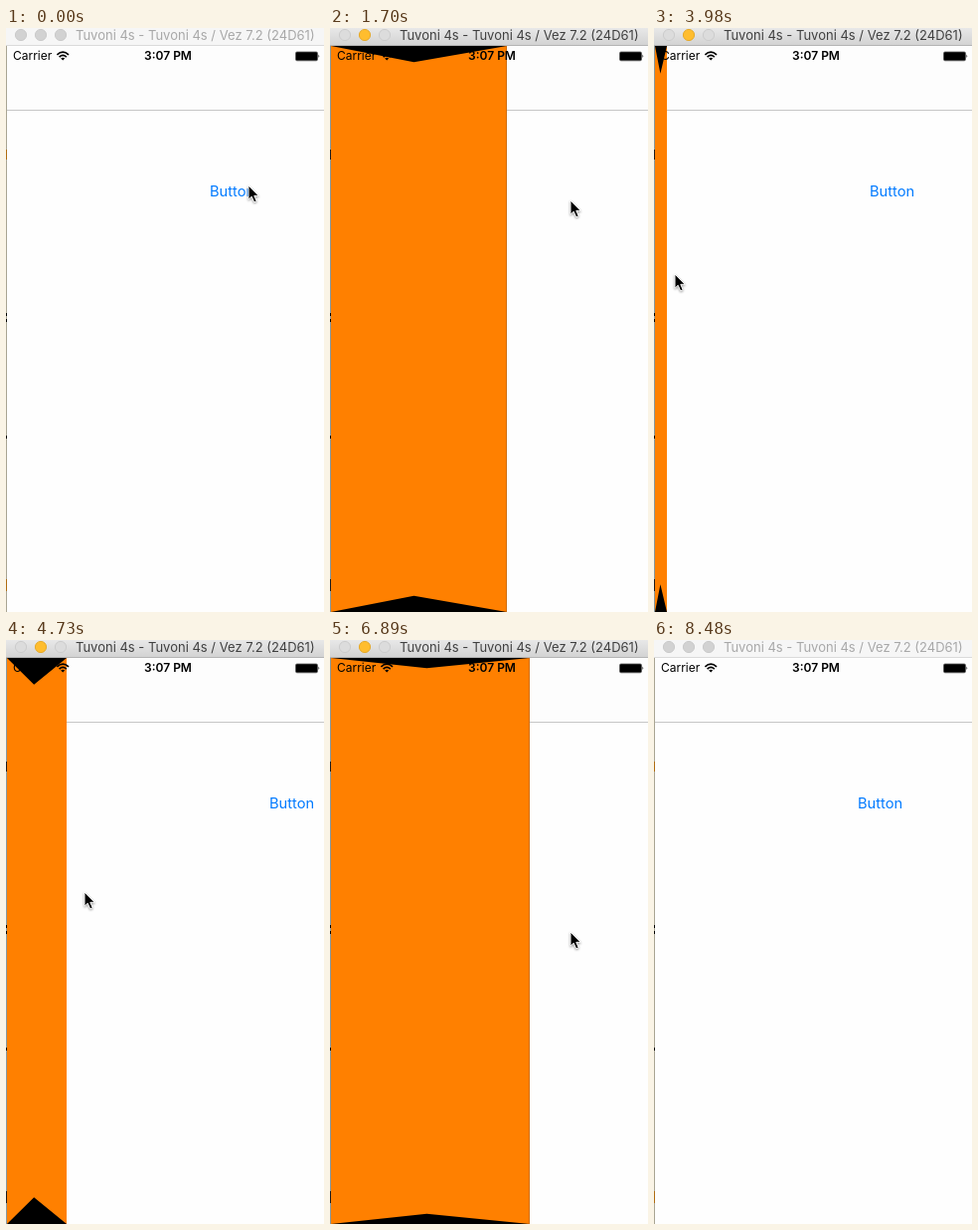
An HTML page for the animation above (8.52 s loop, 320 px wide and 586 px high).

```html
<!DOCTYPE html>
<html lang="en">
<head>
<meta charset="utf-8">
<title>Folding drawer</title>
<style>
  html, body { margin: 0; width: 100%; height: 100%; overflow: hidden; background: #fefefe; }
  svg { display: block; width: 320px; height: 586px; font-family: Inter, "Liberation Sans", sans-serif; }
  #edge { fill: #a9a593; }
  #marks { fill: #b06c10; }
  #bar { fill: #f6f6f6; }
  #barLine { fill: #dadada; }
  #title { font-size: 13px; fill: #a8a8a8; }
  .light { fill: #d2d2d2; stroke: #cacaca; }
  .active #edge { fill: #87979b; }
  .active #marks { fill: #1c1c1c; }
  .active #bar { fill: url(#chrome); }
  .active #barLine { fill: #b4b4b4; }
  .active #title { fill: #404040; }
  .active .light { fill: #dcdcdc; stroke: #cccccc; }
  .active .mini { fill: #ffbd2e; stroke: #e6aa2a; }
  #button { font-size: 14.7px; fill: #007aff; }
  #button.pressed { fill: #cfe4fd; }
  #cursor { filter: drop-shadow(0 1px 1px rgba(0, 0, 0, .4)); }
  .status { font-size: 12px; }
</style>
</head>
<body>
<svg id="stage" viewBox="0 0 320 586">
  <defs>
    <linearGradient id="chrome" x2="0" y2="1">
      <stop offset="0" stop-color="#e8e8e8"/>
      <stop offset="1" stop-color="#d3d3d3"/>
    </linearGradient>
  </defs>

  <rect width="320" height="586" fill="#fefefe"/>

  <g id="page">
    <rect y="18" width="320" height="64" fill="#fdfdfd"/>
    <rect y="82" width="320" height="1" fill="#c6c6c6"/>
    <text id="button" x="205" y="168.5">Button</text>
  </g>

  <g id="drawer">
    <rect id="back" x="1" y="18" height="568"/>
    <path id="fold" fill="#ff8000"/>
    <rect id="rim" y="18" width="1" height="568" fill="#b06010"/>
  </g>

  <text class="status" x="7" y="32.4">Carrier</text>
  <g fill="none" stroke="#000" stroke-width="1.7">
    <path d="M51.4 26.8Q57.2 21.4 63 26.8M53.6 29.1Q57.2 25.8 60.8 29.1"/>
    <path d="M57.2 32.6l-2-2.1q2-1.6 4 0z" fill="#000" stroke="none"/>
  </g>
  <text class="status" x="163" y="32.4" text-anchor="middle" font-weight="600">3:07 PM</text>
  <rect x="291.5" y="24" width="22" height="8.8" rx="1.4" stroke="#555" stroke-width=".8"/>
  <path d="M314.5 26.5q1.6 1.8 0 3.6z"/>

  <rect id="edge" width="1" height="586"/>
  <g id="marks">
    <rect y="122" width="1" height="10"/>
    <rect y="553" width="1" height="12"/>
  </g>
  <path d="M0 286h1v3h-1zM0 292h1v3h-1zM0 409h1v3h-1z"/>

  <rect id="bar" width="320" height="17"/>
  <rect id="barLine" y="17" width="320" height="1"/>
  <circle class="light" cx="15" cy="7" r="5.6"/>
  <circle class="light mini" cx="35" cy="7" r="5.6"/>
  <circle class="light" cx="55" cy="7" r="5.6"/>
  <text id="title" x="70" y="12">Tuvoni 4s - Tuvoni 4s / Vez 7.2 (24D61)</text>

  <path id="cursor" d="M0 0V14.2L3.2 11.2L5.7 16.8L8.2 15.7L5.8 10.3H10.2Z"
        stroke="#fff" stroke-width="1" stroke-linejoin="round"/>
</svg>

<script>
const LOOP = 8520, CLICK = 1110, RELEASED = 3400, CLOSE = 7150, RESET = 8480;
const FULL = 213;      // drawer width when open
const DEPTH = 980;     // perspective distance
const MID = 302, HALF = 284;
const $ = id => document.getElementById(id);

const clamp = (v, lo, hi) => Math.min(hi, Math.max(lo, v));
const mix = (a, b, u) => a + (b - a) * u;
const ramp = (t, from, to) => clamp((t - from) / (to - from), 0, 1);
const smooth = u => u * u * (3 - 2 * u);

// The pointer rests between strokes: start, end, x, y reached.
const strokes = [
  [500, 820, 222, 162],
  [1300, 1700, 242, 173],
  [1700, 2250, 268, 225],
  [2500, 2980, 133, 215],
  [2980, 3500, 7, 246],
  [3850, 4550, 84, 253],
  [4670, 5530, 10, 256],
  [5600, 6160, 184, 278],
  [6300, 7010, 254, 296],
  [7150, 7610, 237, 298]
];

const pointerAt = t => strokes.reduce(([x, y], [from, to, nx, ny]) => {
  const u = ramp(t, from, to);
  return [mix(x, nx, u), mix(y, ny, u)];
}, [244, 158]);

// A tap opens, a drag closes, edge drags open again, a last tap closes.
function widthAt(t, x) {
  const tapped = FULL * smooth(ramp(t, 1050, 1930));
  if (t < 2500) return tapped;
  if (t < RELEASED) return clamp(x - 55, 0, FULL);
  if (t < CLOSE) {
    const dragged = clamp((x - 7) * 0.832, 0, FULL);
    return mix(dragged, FULL, ramp(t, 6850, 7010));
  }
  return FULL * (1 - smooth(ramp(t, CLOSE, 7872)));
}

// Two hinged panels seen in perspective from the left edge.
function drawDrawer(w) {
  $('page').setAttribute('transform', `translate(${w})`);
  $('drawer').style.display = w > 0 ? '' : 'none';
  const depth = Math.sqrt(FULL * FULL - w * w) / 2;
  const scale = DEPTH / (DEPTH + depth);
  const right = 1 + w, hinge = 1 + w / 2 * scale;
  const top = MID - HALF, bottom = MID + HALF;
  const dip = HALF * scale;
  $('back').setAttribute('width', w);
  $('fold').setAttribute('d',
    `M1 ${top}L${hinge} ${MID - dip}L${right} ${top}V${bottom}L${hinge} ${MID + dip}L1 ${bottom}Z`);
  $('rim').setAttribute('x', right - 1);
  $('rim').setAttribute('opacity', w > 100 ? 0.6 : 0);
}

function draw() {
  const t = performance.now() % LOOP;
  const [x, y] = pointerAt(t);
  drawDrawer(Math.round(widthAt(t, x)));
  $('cursor').setAttribute('transform', `translate(${Math.round(x)} ${Math.round(y)})`);
  $('cursor').style.display = t < RESET ? '' : 'none';
  $('stage').classList.toggle('active', t >= CLICK && t < RESET);
  $('button').classList.toggle('pressed', t >= CLICK && t < RELEASED);
  requestAnimationFrame(draw);
}
draw();
</script>
</body>
</html>
```
